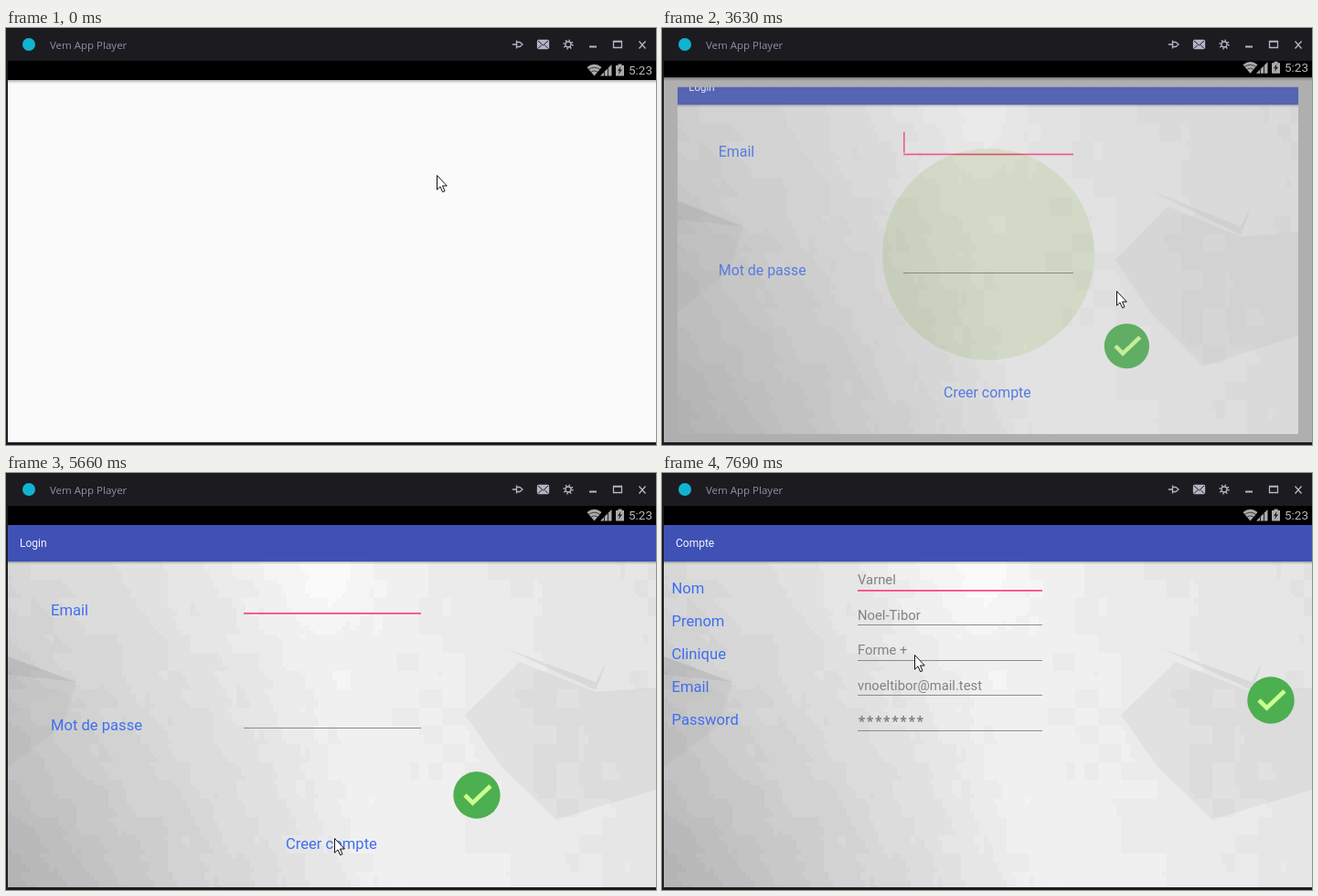
Write an HTML page with a canvas that moves like this. It is 711 by 457 pixels and loops after 8 s.

```html
<!DOCTYPE html>
<html lang="fr">
<head>
<meta charset="utf-8">
<title>App demo</title>
<style>
  html, body { margin: 0; width: 100%; height: 100%; overflow: hidden; background: #1c1b20; }
  svg { position: absolute; left: 0; top: 0; display: block; }
  #device { position: absolute; left: 2px; top: 36px; width: 709px; height: 418px; overflow: hidden; }
  .screen, .dim { position: absolute; inset: 0; opacity: 0; }
  .screen { clip-path: inset(21px 0 0 0); }
  .dim { background: #000; }
  canvas { position: absolute; left: 0; top: 61px; width: 709px; height: 357px; }
  text { font-family: Roboto, sans-serif; }
  .label { font-size: 16.6px; fill: #3f6fee; }
  .value { font-size: 14.8px; fill: #828282; }
  .title { font-size: 12px; fill: #f4f5fb; }
  .pink { fill: #ff4081; }
  .rule { fill: #8c8c8c; }
</style>
</head>
<body>
<svg width="711" height="457">
  <circle cx="25" cy="18" r="7" fill="#10b4d2"/>
  <text x="48" y="22.5" fill="#8d90aa" style="font:11.5px 'Open Sans',sans-serif">Vem App Player</text>
  <g fill="none" stroke="#b4b5c6" stroke-width="1.3">
    <path d="M554 18h4.5M558.5 13.500v9M559 15.500h3l3 2.500-3 2.500h-3"/>
    <rect x="581.5" y="13.5" width="12" height="9" rx="1" fill="#b4b5c6"/>
    <path d="M582 14l5.5 5 5.5-5M582 22.5l4-4M593 22.5l-4-4" stroke="#1c1b20" stroke-width="1"/>
    <circle cx="615" cy="18" r="3"/>
    <circle cx="615" cy="18" r="4.6" stroke-width="2" stroke-dasharray="1.4 2.213"/>
    <path d="M638 20.5h8" stroke-width="2"/>
    <path d="M664.5 14.5h9v7h-9zM664 15h10M692.5 14.5l7 8M699.5 14.5l-7 8"/>
  </g>
</svg>

<div id="device">
  <svg width="709" height="418" viewBox="2 36 709 418">
    <defs>
      <linearGradient id="fade" x2="0" y2="1">
        <stop stop-opacity=".28"/><stop offset="1" stop-opacity="0"/>
      </linearGradient>
      <g id="check">
        <circle r="25.7" fill="#4caf50"/>
        <path d="M-13 0l8.5 8.5L15-10" fill="none" stroke="#ccff90" stroke-width="4.6"/>
      </g>
    </defs>
    <rect id="paper" x="2" y="36" width="709" height="418"/>
    <circle id="mark" cx="357" cy="248" r="116" fill="#8dc63f"/>
    <rect id="barShadow" x="2" y="57" width="709" height="4" fill="url(#fade)"/>
  </svg>

  <div class="dim" id="loginDim"></div>
  <div class="screen" id="login">
    <canvas width="709" height="357"></canvas>
    <svg width="709" height="418" viewBox="2 36 709 418">
      <g id="loginBar"></g>
      <g id="emailRow">
        <text class="label" x="49" y="156">Email</text>
        <rect class="pink" x="260" y="153" width="194" height="1.7"/>
        <rect class="pink" id="loginCaret" x="260" y="128" width="1.6" height="24"/>
      </g>
      <g id="passRow">
        <text class="label" x="49" y="282">Mot de passe</text>
        <rect class="rule" x="260" y="279" width="194" height="1"/>
      </g>
      <use href="#check" x="515" y="353"/>
      <text class="label" x="306" y="411.5">Creer compte</text>
    </svg>
  </div>

  <div class="dim" id="accountDim"></div>
  <div class="screen" id="account">
    <canvas width="709" height="357"></canvas>
    <svg width="709" height="418" viewBox="2 36 709 418">
      <g id="accountBar"></g>
      <g id="fields"></g>
      <rect class="pink" id="accountCaret" x="214" y="105" width="1.6" height="21"/>
      <use href="#check" x="666" y="249"/>
    </svg>
  </div>

  <svg width="709" height="418" viewBox="2 36 709 418">
    <g id="status">
      <rect x="2" y="36" width="709" height="21"/>
      <path d="M635.5 43q8-6.5 16 0l-8 9.5z" fill="#aaa"/>
      <path d="M637 45.5q6.5-4.5 13 0M639.5 48.3q4-2.8 8 0" fill="none" stroke="#222" stroke-width=".8"/>
      <path d="M650 52.5l12.5-12.5v12.5z" fill="#aaa"/>
      <path d="M654.5 47v6M658.5 43v10" stroke="#222"/>
      <path d="M669.5 39.5h4v1.5h2.5v11.5h-9v-11.5h2.5z" fill="#aaa"/>
      <path d="M672.5 42l-3.5 5h2l-1 4 4-5.5h-2.2z" fill="#222"/>
      <text x="681" y="51.3" font-size="13.5" fill="#b8b8b8">5:23</text>
    </g>
  </svg>
</div>

<svg width="711" height="457">
  <path id="cursor" d="M.5.5V16.2L4 12.9 6.6 18.7 9 17.7 6.5 12H11.3Z" fill="#fff" stroke="#111"/>
</svg>

<script>
const $ = id => document.getElementById(id);
const clamp = v => Math.min(1, Math.max(0, v));

// Title bars and form rows
const appBar = title => `<rect x="2" y="57" width="709" height="40" fill="#3f51b5"/>
  <rect x="2" y="97" width="709" height="3" fill="url(#fade)"/>
  <text class="title" x="15" y="81">${title}</text>`;
$('loginBar').innerHTML = appBar('Login');
$('accountBar').innerHTML = appBar('Compte');

const rows = [['Nom', 'Varnel'], ['Prenom', 'Noel-Tibor'], ['Clinique', 'Forme +'],
  ['Email', 'vnoeltibor@mail.test'], ['Password', '********']];
$('fields').innerHTML = rows.map(([label, value], i) => {
  const y = 128.3 + i * 38.5;
  const secret = label === 'Password';
  const mono = secret ? `style="font:600 15.2px 'Noto Sans Mono',monospace"` : '';
  return `<text class="label" x="10.5" y="${132 + i * 36}">${label}</text>
    <text class="value" x="214" y="${y - (secret ? 4 : 6.3)}" ${mono}>${value}</text>
    <rect class="${i ? 'rule' : 'pink'}" x="214" y="${Math.floor(y)}" width="202" height="${i ? 1 : 1.7}"/>`;
}).join('');

// Backdrop: a bright slanted ridge falling off to both sides, posterised in small cells
const hash = (x, y) => { const s = Math.sin(x * 12.99 + y * 78.23) * 43758.5; return s - Math.floor(s); };
function tone(x, y) {
  const side = (x - 330 - y / 4) / 350;
  const slope = side < 0 ? side * (27 + 26 * y / 357) : -13 * side;
  const glow = 9 * Math.exp(-((x - 335) ** 2 + y ** 2) / 6000);
  const patch = 4 * (hash(Math.floor(x / 25), Math.floor(y / 20)) - .5);
  return Math.round((241 + slope + glow + patch) / 5) * 5;
}
const [backdrop, copy] = document.querySelectorAll('canvas');
const ctx = backdrop.getContext('2d');
const cell = 5;
for (let y = 0; y < 357; y += cell) {
  for (let x = 0; x < 709; x += cell) {
    const grey = tone(x, y);
    ctx.fillStyle = `rgb(${grey},${grey},${grey})`;
    ctx.fillRect(x, y, cell, cell);
  }
}
function facet(path, alpha) {
  ctx.fillStyle = `rgba(0,0,0,${alpha})`;
  ctx.fill(new Path2D(path));
}
facet('M0 104L75 132 0 170Z', .04);
facet('M0 104L75 132 0 124Z', .05);
facet('M75 132L0 170V225L60 180Z', .03);
facet('M540 93L643 141 656 108 643 132Z', .06);
facet('M500 168L560 110 643 143 709 138V250L600 283 540 225Z', .045);
copy.getContext('2d').drawImage(backdrop, 0, 0);

// Timeline in ms; the screen is sampled every TICK from the latest cue
const TICK = 130, BLINK = 490;
const LAUNCH = 700, LOGIN = 3630, SETTLE = 3890, ACCOUNT = 6250;
const sample = t => {
  const cue = [ACCOUNT, LOGIN, LAUNCH, 0].find(start => start <= t);
  return cue + Math.floor((t - cue) / TICK) * TICK;
};

const easeOut = p => 1 - (1 - clamp(p)) ** 2;
const smooth = p => p * p * (3 - 2 * p);
// A transition first seen at `start`, already `lead` ms under way
const enter = (t, start, lead, duration = 285) => t < start ? 0 : easeOut((t - start + lead) / duration);
const caretOn = t => Math.floor((t - 4190) / BLINK) % 2 === 0;

const stops = [
  [950, 471, 161], [1220, 483, 193], [1350, 497, 283], [1480, 497, 288],
  [3950, 497, 288], [4670, 359, 403], [4930, 359, 400],
  [6420, 359, 400], [6770, 382, 382], [6900, 382, 372],
  [7160, 330, 274], [7340, 330, 274], [7680, 276, 199]];
function cursorAt(t) {
  const next = stops.findIndex(stop => stop[0] > t);
  if (next <= 0) return (next ? stops.at(-1) : stops[0]).slice(1);
  const [t0, x0, y0] = stops[next - 1], [t1, x1, y1] = stops[next];
  const p = smooth((t - t0) / (t1 - t0));
  return [x0 + (x1 - x0) * p, y0 + (y1 - y0) * p].map(Math.round);
}

const move = (id, x, y) => $(id).setAttribute('transform', `translate(${x} ${y})`);
function showWindow(name, e) {
  $(name).style.transform = `scale(${.8 + .2 * e})`;
  $(name).style.opacity = e;
  $(name + 'Dim').style.opacity = .5 * e * e;
}

function draw() {
  const t = sample(performance.now() % 8000);

  $('paper').setAttribute('fill', t < LAUNCH ? '#fafafa' : '#fefefe');
  $('mark').style.opacity = t < LAUNCH ? 0 : 1;
  const slide = -21 * enter(t, LAUNCH, TICK, 5 * TICK) * (1 - enter(t, LOGIN, 180));
  move('status', 0, slide);
  move('barShadow', 0, slide);

  showWindow('login', enter(t, LOGIN, 155));
  showWindow('account', enter(t, ACCOUNT, 85));

  // The login form is first laid out beneath the status bar, then settles
  const raise = t < SETTLE ? 20 : 0;
  move('loginBar', 0, -raise);
  move('emailRow', 0, -raise);
  move('passRow', 0, -raise / 2);
  backdrop.style.top = 61 - raise + 'px';
  backdrop.style.height = 357 + raise + 'px';

  const now = performance.now() % 8000;
  $('loginCaret').style.opacity = t < SETTLE || caretOn(now) ? 1 : 0;
  $('accountCaret').style.opacity = caretOn(now) ? 1 : 0;
  move('cursor', ...cursorAt(t));
  requestAnimationFrame(draw);
}
draw();
</script>
</body>
</html>
```
